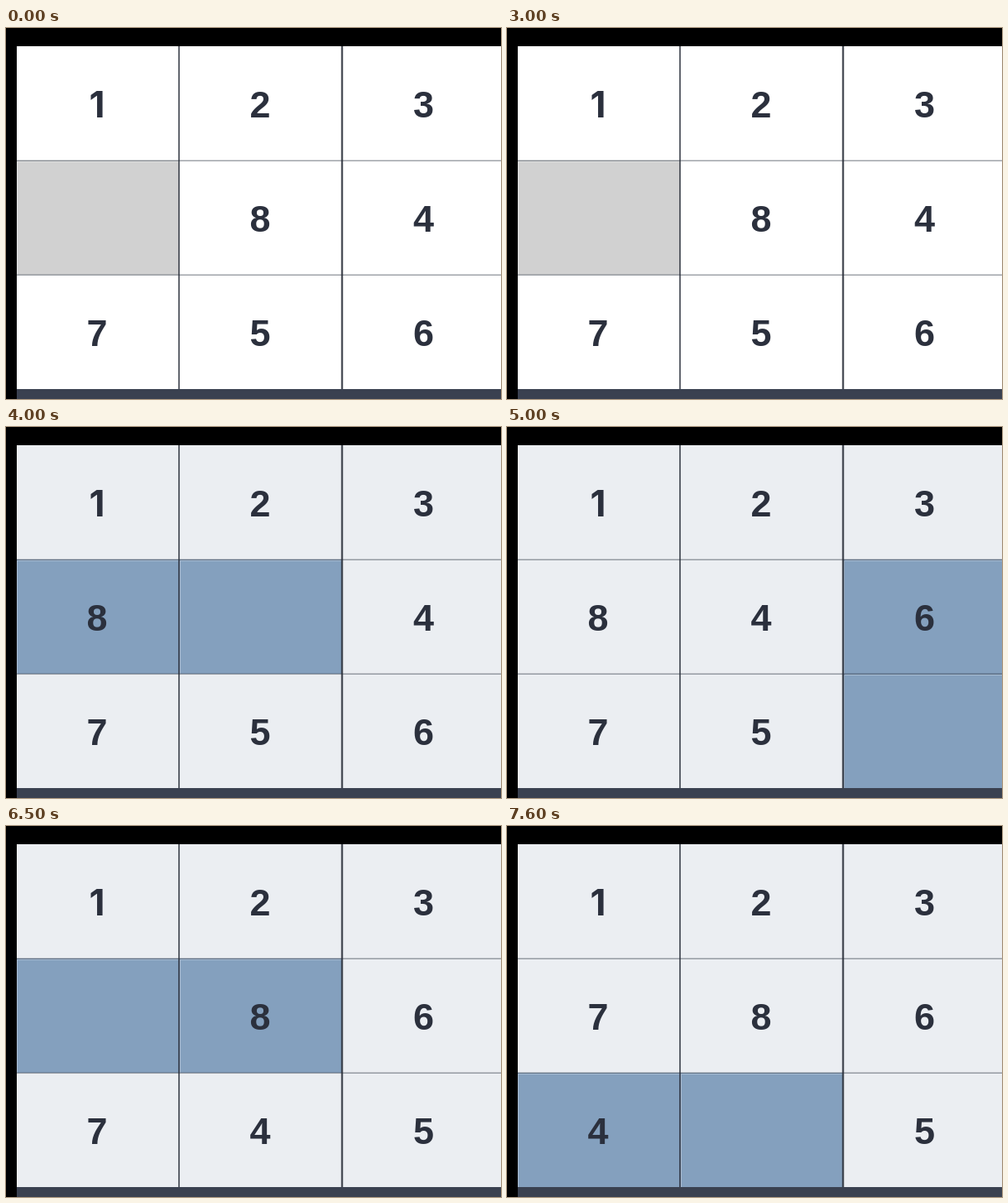
An HTML page that plays this animation: 598x448 px, repeating every 8 s.

```html
<!DOCTYPE html>
<html lang="en">
<head>
<meta charset="utf-8">
<title>Sliding puzzle</title>
<style>
html, body { margin: 0; width: 100%; height: 100%; overflow: hidden; background: #000; }
svg { display: block; width: 598px; height: 448px; }
text {
  font: 700 45px "Liberation Sans", Arial, sans-serif;
  fill: #2b303d;
  text-anchor: middle;
}
text.one { font-family: Inter, Roboto, sans-serif; font-size: 44px; }
</style>
</head>
<body>
<svg id="stage" viewBox="0 0 598 448"></svg>
<script>
const LOOP = 8000;
const WHITE = "#ffffff", PALE = "#ebeef2", GREY = "#d1d1d1", BLUE = "#84a0be";
const COLS = [[13, 209], [209, 406], [406, 598]];
const ROWS = [[22, 160], [160, 298], [298, 436]];
const TEXT_X = [110, 307, 504.5];
const BASE_Y = [107.5, 245.5, 383.5];

// start time, tiles in reading order (0 = gap), tinted cells, tint, tile colour
const STEPS = [
  [0,    "123084756", [3],    GREY, WHITE],
  [3400, "123084756", [],     BLUE, PALE],
  [3900, "123804756", [3, 4], BLUE, PALE],
  [4500, "123840756", [4, 5], BLUE, PALE],
  [5000, "123846750", [5, 8], BLUE, PALE],
  [5500, "123846705", [7, 8], BLUE, PALE],
  [6000, "123806745", [4, 7], BLUE, PALE],
  [6500, "123086745", [3, 4], BLUE, PALE],
  [7000, "123786045", [3, 6], BLUE, PALE],
  [7500, "123786405", [6, 7], BLUE, PALE]
];

const stage = document.getElementById("stage");

function add(tag, attrs) {
  const el = document.createElementNS("http://www.w3.org/2000/svg", tag);
  for (const key in attrs) el.setAttribute(key, attrs[key]);
  return stage.appendChild(el);
}

function rect(x, y, width, height, fill) {
  return add("rect", { x, y, width, height, fill });
}

const cells = [];
for (let i = 0; i < 9; i++) {
  const c = i % 3, r = Math.floor(i / 3);
  const [x0, x1] = COLS[c], [y0, y1] = ROWS[r];
  const face = rect(x0, y0, x1 - x0, y1 - y0, WHITE);
  const left = c ? x0 + 1 : x0;
  const shine = add("path", {
    d: `M${left + 0.5} ${y1}V${y0 + 1.5}H${x1}`,
    fill: "none", stroke: "#fff", "stroke-opacity": 0.3
  });
  const label = add("text", { x: TEXT_X[c], y: BASE_Y[r] });
  cells.push({ face, shine, label });
}

// grid lines and the bar under the board
for (const y of [160, 298]) rect(13, y - 0.5, 585, 1.5, "rgba(43,52,64,.45)");
rect(208, 22, 2, 414, "rgba(38,43,54,.72)");
rect(404.8, 22, 2.4, 414, "rgba(38,43,54,.82)");
rect(13, 436, 585, 12, "#3a4150");

let shown = null;

function show(step) {
  if (step === shown) return;
  shown = step;
  const [, tiles, marked, tint, plain] = step;
  cells.forEach(({ face, shine, label }, i) => {
    const on = marked.includes(i);
    face.setAttribute("fill", on ? tint : plain);
    shine.setAttribute("visibility", on ? "visible" : "hidden");
    label.textContent = tiles[i] === "0" ? "" : tiles[i];
    label.setAttribute("class", tiles[i] === "1" ? "one" : "");
  });
}

const start = performance.now();

function frame() {
  const t = (performance.now() - start) % LOOP;
  show(STEPS.findLast(step => step[0] <= t) || STEPS[0]);
  requestAnimationFrame(frame);
}
frame();
</script>
</body>
</html>
```
